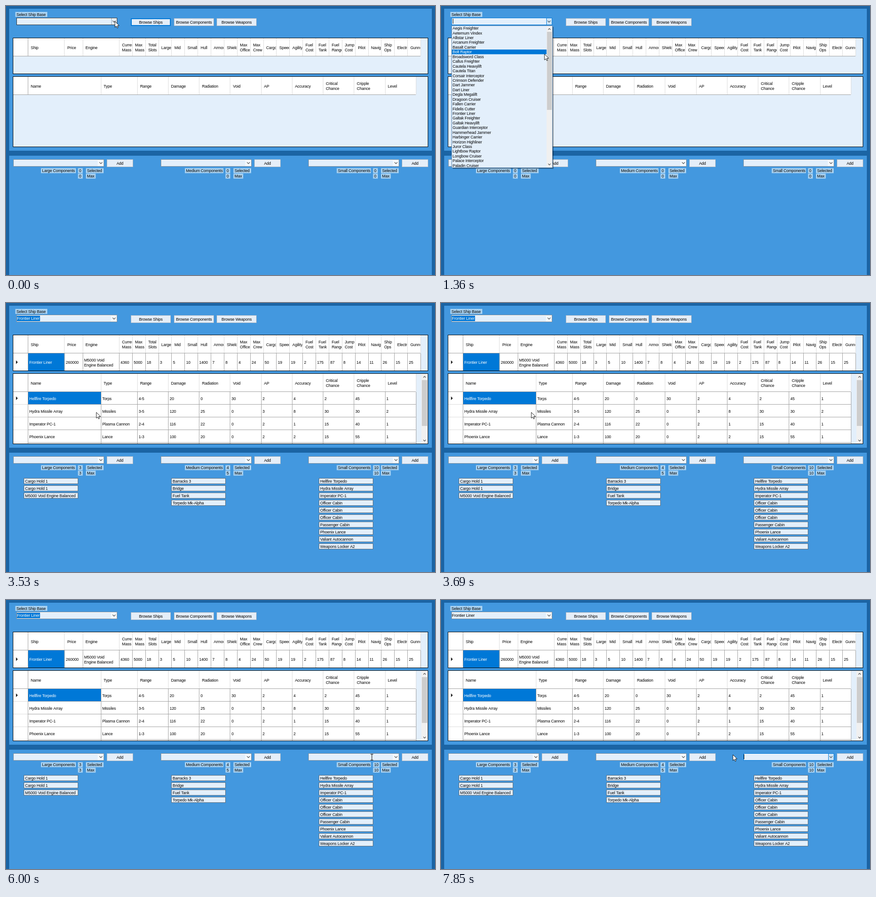
These frames come from a looping animation (945x593 px, 8000 ms). An HTML page with a canvas:

```html
<!DOCTYPE html>
<html lang="en">
<head>
<meta charset="utf-8">
<title>Ship builder</title>
<style>
html, body { margin: 0; width: 100%; height: 100%; overflow: hidden; background: #1b64a4; }
canvas { display: block; width: 945px; height: 593px; }
</style>
</head>
<body>
<canvas id="stage" width="945" height="593"></canvas>
<script>
const ctx = document.getElementById('stage').getContext('2d');
const LOOP = 8000, ROW = 10.43;
const PALE = '#e3effb', PANEL = '#4398df', BLUE = '#0078d7', LABEL = '#a9d2f1', GRID = '#a0a0a0';

// Bursts of activity: start, end, number of steps.
const bursts = [[120, 390, 3], [820, 1750, 8], [1870, 2850, 8], [3380, 4380, 8],
  [4500, 5460, 8], [5610, 6650, 9], [6770, 7050, 3], [7580, 7850, 3]];

// Pointer path: time, x, y.
const path = [[0, 240, 34], [690, 240, 34], [1351, 228, 106], [1750, 212, 157], [2570, 201, 231],
  [2850, 199, 241], [3666, 199, 241], [4380, 140, 410], [4900, 430, 450], [5460, 840, 498],
  [6000, 806, 346], [6390, 855, 349], [7450, 855, 349], [7715, 690, 344], [7850, 643, 341]];

const ships = ['Aegis Freighter', 'Aeternum Vindex', 'Allistar Liner', 'Arcanum Freighter', 'Basalt Carrier',
  'Bolt Raptor', 'Broadsword Class', 'Callus Freighter', 'Cautela Heavylift', 'Cautela Titan',
  'Corsair Interceptor', 'Crimson Defender', 'Dart Jammer', 'Dart Liner', 'Degla Megalift',
  'Dragoon Cruiser', 'Fallen Carrier', 'Fidelis Cutter', 'Frontier Liner', 'Galtak Freighter',
  'Galtak Heavylift', 'Guardian Interceptor', 'Hammerhead Jammer', 'Harbinger Carrier',
  'Horizon Highliner', 'Juror Class', 'Lightbow Raptor', 'Longbow Cruiser', 'Palace Interceptor', 'Paladin Cruiser'];

const parts = ['Aramech Missile Pod', 'Aramech X2 Missile Battery', 'Armored Bulkheads', 'Armored Bulkheads 2',
  'Armored Bulkheads 3', 'Armored Bulkheads 4', 'Armored Bulkheads 5', 'Arratech Missile Pod',
  'Blazelight Railgun', 'Boarding Assault System', 'Boarding Assault System 2', 'Boarding Assault System 3',
  'Boarding Assault System 4', 'Cargo-Fuel Pod', 'Centurion Radiation Array', 'Cloudstrike Lance',
  'Commander PC-1', 'Defense Pattern Matrix', 'Defense Pattern Matrix 2', 'Defense Pattern Matrix 3',
  'Defense Pattern Matrix 4', 'Depth Scanner Omega', 'Dracos Missile Array'];

const shipGrid = {
  y: 70, h: 79, widths: [80.4, 40.2, 80.4, ...Array(23).fill(28.87)], rowH: 39,
  heads: ('Ship,Price,Engine,Current|Mass,Max|Mass,Total|Slots,Large,Mid,Small,Hull,Armour,Shield,Max|Officer,' +
    'Max|Crew,Cargo,Speed,Agility,Fuel|Cost,Fuel|Tank,Fuel|Range,Jump|Cost,Pilot,Navigation,Ship|Ops,Electronics,Gunnery').split(','),
  rows: ['Frontier Liner,260000,M5000 Void|Engine Balanced,4360,5000,18,3,5,10,1400,7,8,4,24,50,19,19,2,175,87,8,14,11,26,15,25']
};
const weaponGrid = {
  y: 155, h: 155, widths: [160.6, 80.3, ...Array(9).fill(68.2)], rowH: 28,
  heads: 'Name,Type,Range,Damage,Radiation,Void,AP,Accuracy,Critical|Chance,Cripple|Chance,Level'.split(','),
  rows: ['Hellfire Torpedo,Torps,4-5,20,0,30,2,4,2,45,1', 'Hydra Missile Array,Missiles,3-5,120,25,0,3,8,30,30,2',
    'Imperator PC-1,Plasma Cannon,2-4,116,22,0,2,1,15,40,1', 'Phoenix Lance,Lance,1-3,100,20,0,2,2,15,55,1', '']
};
const bays = [
  { name: 'Large', left: 77, max: 3, items: ['Cargo Hold 1', 'Cargo Hold 1', 'M5000 Void Engine Balanced'] },
  { name: 'Medium', left: 394, max: 5, items: ['Barracks 3', 'Bridge', 'Fuel Tank', 'Torpedo Mk-Alpha'] },
  { name: 'Small', left: 728.5, max: 10, items: ['Hellfire Torpedo', 'Hydra Missile Array', 'Imperator PC-1',
    'Officer Cabin', 'Officer Cabin', 'Officer Cabin', 'Passenger Cabin', 'Phoenix Lance',
    'Valiant Autocannon', 'Weapons Locker A2'] }
];

function fill(x, y, w, h, color) {
  ctx.fillStyle = color;
  ctx.fillRect(x, y, w, h);
}

function box(x, y, w, h, face, edge, line = 1) {
  fill(x, y, w, h, edge);
  fill(x + line, y + line, w - 2 * line, h - 2 * line, face);
}

// Text is placed by its vertical middle; "|" breaks a line.
function text(str, x, y, color = '#000', align = 'left') {
  const lines = str.split('|');
  ctx.fillStyle = color;
  ctx.textAlign = align;
  lines.forEach((s, i) => ctx.fillText(s, x, y + 3.2 + (i - (lines.length - 1) / 2) * 10.6));
}

function shape(points, color, edge) {
  ctx.beginPath();
  points.forEach(([x, y]) => ctx.lineTo(x, y));
  ctx.closePath();
  ctx.fillStyle = color;
  ctx.fill();
  if (edge) { ctx.strokeStyle = edge; ctx.lineWidth = 0.9; ctx.stroke(); }
}

function chevron(x, y, dir = 1, size = 3.2) {
  ctx.beginPath();
  ctx.moveTo(x - size, y - dir * size / 2);
  ctx.lineTo(x, y + dir * size / 2);
  ctx.lineTo(x + size, y - dir * size / 2);
  ctx.strokeStyle = '#444';
  ctx.lineWidth = 1.1;
  ctx.stroke();
}

function button(label, x, y, w, focused) {
  box(x, y, w, 17, '#e5eef8', focused ? BLUE : '#b3bcc6', focused ? 2 : 1);
  text(label, x + w / 2, y + 8.5, '#000', 'center');
}

function label(str, x, y, w) {
  fill(x, y - 5.5, w, 11, LABEL);
  text(str, x + 2.5, y);
}

function combo(x, y, w, active, hot) {
  box(x, y, w, 16, PALE, active ? BLUE : hot ? '#333' : '#8b9299');
  fill(x + 1, y + 1, w - 2, 1, '#fff');
  if (active) box(x + w - 13, y, 13, 16, '#cce4f7', BLUE);
  else if (hot) fill(x + w - 13, y + 1, 1, 14, '#8fa9bf');
  else fill(x + w - 14, y + 1, 13, 14, '#f3f8fd');
  chevron(x + w - 7, y + 8);
}

function scrollbar(x, top, bottom, w, thumbTop, thumbBottom) {
  fill(x, top, w, bottom - top, '#f0f0f0');
  fill(x + 1, thumbTop, w - 2, thumbBottom - thumbTop, '#cdcdcd');
  chevron(x + w / 2, top + 7, -1, 2.7);
  chevron(x + w / 2, bottom - 7, 1, 2.7);
}

function dropdown(items, x, y, w, h, thumb, picked, open = 1) {
  ctx.save();
  ctx.beginPath();
  ctx.rect(x, y, w + 3, (h + 3) * open);
  ctx.clip();
  fill(x + 3, y + 3, w - 1, h - 1, 'rgba(0,0,0,.35)');
  box(x, y, w, h, PALE, '#557fa8');
  items.forEach((item, i) => {
    const mid = y + 6 + i * ROW;
    if (i === picked) fill(x + 1, mid - 5.2, w - 14, 10.4, BLUE);
    text(item, x + 2.5, mid, i === picked ? '#fff' : '#000');
  });
  scrollbar(x + w - 13.5, y + 1, y + h - 1, 12.5, ...thumb);
  ctx.restore();
}

function cell(str, x, y, w, h, pad, color) {
  ctx.save();
  ctx.beginPath();
  ctx.rect(x, y, w - 0.5, h);
  ctx.clip();
  text(str, x + pad, y + h / 2 + 0.5, color);
  ctx.restore();
}

function grid({ y, h, widths, rowH, heads, rows }, filled) {
  box(15, y, 915, h + 1, PALE, '#000');
  ctx.save();
  ctx.beginPath();
  ctx.rect(16, y + 1, 913, h - 1);
  ctx.clip();
  const right = 48 + widths.reduce((a, b) => a + b, 0);
  fill(16, y + 1, right - 16, 40, '#fff');
  let x = 48;
  heads.forEach((head, i) => {
    cell(head, x, y + 1, widths[i], 40, 6.5);
    x += widths[i];
    fill(Math.round(x), y + 1, 1, 39, '#dcdcdc');
  });
  fill(16, y + 40, right - 16, 1, GRID);
  if (filled) rows.forEach((row, r) => {
    const top = y + 41 + r * rowH;
    fill(16, top, right - 16, rowH, '#fff');
    let left = 48;
    row.split(',').forEach((value, i) => {
      const picked = !r && !i;
      if (picked) fill(left + 1, top, widths[0], rowH - 1, BLUE);
      cell(value, left, top, widths[i], rowH, 3.3, picked ? '#fff' : '#000');
      left += widths[i];
    });
    left = 48;
    widths.forEach(w => fill(Math.round(left += w), top, 1, rowH, GRID));
    fill(16, top + rowH - 1, 32, 1, '#dcdcdc');
    fill(48, top + rowH - 1, right - 48, 1, GRID);
    if (!r) {
      const mid = top + rowH / 2;
      shape([[22, mid - 4], [26, mid], [22, mid + 4]], '#222');
    }
  });
  fill(48, y + 1, 1, filled ? h : 40, GRID);
  ctx.restore();
}

function bay({ name, left, max, items }, index, filled, active) {
  const x = 15.5 + index * 325;
  combo(Math.round(x), 338, 200, active);
  button('Add', Math.round(x + 206), 338, 58);
  label(name + ' Components', left, 363, x + 138.5 - left);
  [filled ? items.length : 0, filled ? max : 0].forEach((n, i) =>
    label(String(n), x + 143, 363 + i * 12, n > 9 ? 14.5 : 10.5));
  label('Selected', x + 160.5, 363, 39);
  label('Max', x + 160.5, 375, 21.5);
  if (filled) items.forEach((item, i) => {
    box(Math.round(x + 23.5), 386 + i * 16, 120, 13, PALE, '#5f6b76');
    text(item, x + 26.5, 392.5 + i * 16);
  });
}

function arrow(x, y) {
  shape([[0, 0], [0, 13], [3, 10.3], [5, 14.6], [7, 13.7], [5.1, 9.5], [9.2, 9.2]]
    .map(([dx, dy]) => [x + dx, y + dy]), '#fff', '#000');
}

function ibeam(x, y) {
  fill(x - 0.5, y - 6, 1, 13, '#000');
  fill(x - 3, y - 6.5, 6, 1, '#000');
  fill(x - 3, y + 6.5, 6, 1, '#000');
}

// Holds time at the latest step reached.
function snap(t) {
  let held = 0;
  for (const [start, end, n] of bursts) {
    if (t < start) break;
    const step = (end - start) / (n - 1);
    held = start + Math.min(n - 1, Math.floor((t - start) / step + 1e-6)) * step;
  }
  return held;
}

function pointer(t) {
  const i = path.findIndex(p => p[0] > t);
  if (i < 0) return path[path.length - 1].slice(1);
  const [t0, x0, y0] = path[i - 1], [t1, x1, y1] = path[i];
  const k = (t - t0) / (t1 - t0);
  return [x0 + (x1 - x0) * k, y0 + (y1 - y0) * k];
}

function draw(time) {
  const t = snap(time), [px, py] = pointer(t);
  const shipOpen = t >= 120 && t < 3380;
  const chosen = t >= 3380, filled = t >= 3500;
  const partsActive = t >= 6515, partsOpen = partsActive && t < 7700;

  ctx.font = '8.8px "Liberation Sans", Arial, sans-serif';
  ctx.letterSpacing = '-0.16px';
  fill(0, 0, 945, 593, '#1b64a4');
  fill(7, 6, 931, 313, PANEL);
  fill(7, 330, 931, 263, PANEL);

  label('Select Ship Base', 20.5, 18.5, 70.5);
  combo(23, 26, 222, shipOpen, t < 120);
  if (chosen) {
    const selected = t < 6640;
    if (selected) fill(24, 28, 51, 12, BLUE);
    text('Frontier Liner', 24, 34, selected ? '#fff' : '#000');
  }
  button('Browse Ships', 275, 27, 88, t < 120);
  button('Browse Components', 370, 27, 88);
  button('Browse Weapons', 464, 27, 88);

  grid(shipGrid, filled);
  grid(weaponGrid, filled);
  if (filled) scrollbar(915, 156, 310, 14, 170, 271);
  bays.forEach((b, i) => bay(b, i, filled, i === 2 && partsActive));

  if (shipOpen) {
    const picked = px < 232 && py > 44 ? Math.floor((py - 43.8) / ROW) : -1;
    dropdown(ships, 23, 43, 223, 314, [57, 229], picked, t < 250 ? 0.5 : 1);
    if (t >= 250 && Math.floor((t - 820) / 506) % 2) fill(26, 28, 1, 11, '#000');
    else if (t >= 250 && t < 820) fill(26, 28, 1, 11, '#000');
  }
  if (partsOpen) dropdown(parts, 665, 355, 200, 313, [369, 445], -1);
  if (partsActive && (t < 7040 || t >= 7580)) fill(667, 340, 1, 11, '#000');

  const overField = px > 666 && px < 852 && py > 338 && py < 354;
  (overField ? ibeam : arrow)(px, py);
}

function tick() {
  draw(performance.now() % LOOP);
  requestAnimationFrame(tick);
}
tick();
</script>
</body>
</html>
```
